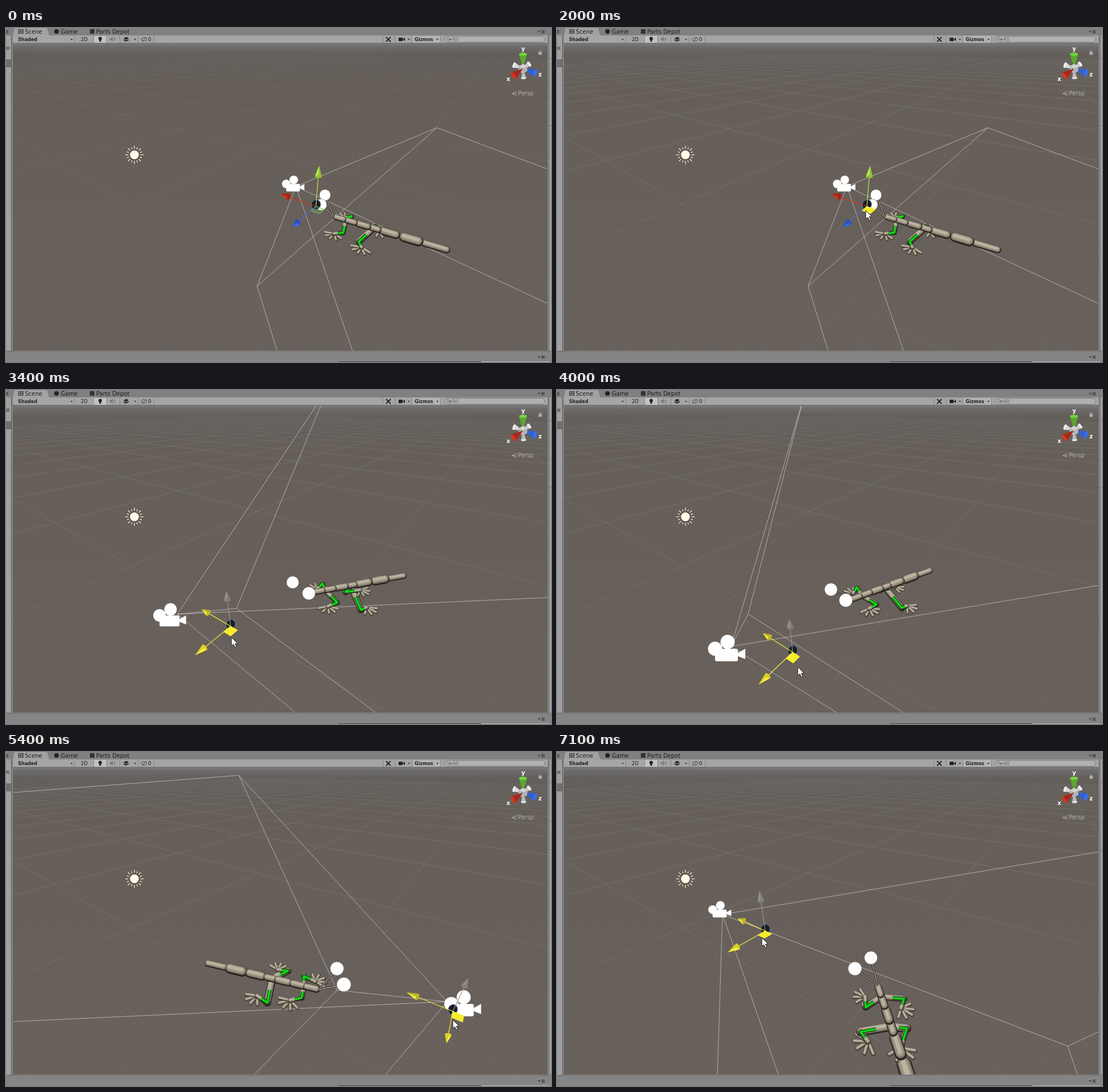
An HTML page with a canvas that plays this animation: 955 px wide and 586 px high, repeating every 7200 ms.

```html
<!DOCTYPE html>
<html lang="en">
<head>
<meta charset="utf-8">
<title>Scene view</title>
<style>
html, body { margin: 0; width: 100%; height: 100%; overflow: hidden; background: #858585; }
canvas { display: block; }
</style>
</head>
<body>
<canvas id="stage" width="955" height="586"></canvas>
<script>
const ctx = document.getElementById('stage').getContext('2d');
const LOOP = 7200, STEP = 100, GRAB = 2100;
const CX = 480, CY = 297, FOCAL = 466, HORIZON = 30;
const times = [2000, 2800, 4000, 5400, 6400, 7100];

// target x y, camera x y width, head x y, heading, two eye offsets, cursor offset
const poses = [
  [543, 313, 503, 273, 39, 575, 331, 149.8, -16, -38, -23, -21, -2, 7],
  [434, 358, 358, 323, 47, 568, 345, 191.4, -27, -22, -3, -2, -7, 11],
  [413, 460, 297, 453, 65, 515, 368, 209.5, -35, -18, -9, 1, 9, 26],
  [783, 455, 800, 441, 64, 548, 417, 341, 32, -37, 44, -9, 0, 15],
  [620, 268, 600, 229, 32, 583, 428, 391.3, 4, -51, 42, -34, -27, 4],
  [365, 314, 285, 276, 40, 562, 410, 454.8, -12, -49, -40, -30, -6, 12]
];
// knee and foot of each leg: front left, front right, hind left, hind right
const legPoses = [
  [591, 359, 575, 361, 606, 330, 592, 333, 618, 375, 623, 385, 646, 347, 654, 357],
  [609, 367, 592, 374, 584, 334, 577, 342, 646, 379, 657, 375, 624, 349, 645, 347],
  [560, 376, 547, 384, 525, 346, 519, 357, 604, 382, 613, 379, 566, 351, 592, 346],
  [522, 393, 542, 403, 518, 431, 498, 436, 494, 384, 476, 382, 458, 440, 440, 428],
  [532, 426, 546, 426, 578, 456, 584, 470, 488, 443, 470, 457, 523, 490, 490, 496],
  [541, 448, 540, 430, 608, 433, 603, 450, 532, 491, 545, 508, 613, 485, 602, 520]
];
// apex, far corners a and b, two ray ends, ends of the edges leaving a and b
const frustums = [
  [508, 278, 755, 175, 440, 453, 607, 566, 948, 483, 948, 247, 475, 566],
  [372, 324, 710, 10, 498, 386, 555, 566, 948, 409, 950, 0, 645, 566],
  [305, 450, 433, 10, 335, 393, 490, 566, 948, 343, 700, 0, 607, 566],
  [773, 438, 408, 41, 580, 418, 665, 566, 13, 473, 13, 71, 435, 566],
  [600, 237, 3000, 2135, 1500, 1668, 193, 566, 13, 405, 3000, 2300, 1500, 2000],
  [290, 285, 2000, 0, 895, 516, 388, 566, 281, 566, 2000, 100, 912, 566]
];

// screen point to ground point and back
function ground([x, y]) {
  const depth = 5380 / (y - HORIZON);
  return [(x - CX) * depth / FOCAL, (depth - 5) / 0.866];
}
function screen([x, z]) {
  const depth = z * 0.866 + 5;
  return [CX + FOCAL * x / depth, HORIZON + 5380 / depth];
}
const frameOf = p => ({ origin: ground([p[5], p[6]]), angle: p[7] * Math.PI / 180 });
function toLocal({ origin, angle }, point) {
  const [x, z] = ground(point), dx = x - origin[0], dz = z - origin[1];
  const c = Math.cos(angle), s = Math.sin(angle);
  return [-dx * c - dz * s, -dx * s + dz * c];
}
function toScreen({ origin, angle }, [back, left]) {
  const c = Math.cos(angle), s = Math.sin(angle);
  return screen([origin[0] - back * c - left * s, origin[1] - back * s + left * c]);
}
const pairs = list => list.filter((_, i) => i % 2 === 0).map((x, i) => [x, list[i * 2 + 1]]);
const legLocals = legPoses.map((row, i) => pairs(row).flatMap(p => toLocal(frameOf(poses[i]), p)));

// smooth curve through the rows of a table
function sample(table, t) {
  const last = times.length - 1;
  if (t <= times[0]) return table[0];
  if (t >= times[last]) return table[last];
  const i = times.findIndex((v, k) => t >= v && t < times[k + 1]);
  const span = times[i + 1] - times[i], u = (t - times[i]) / span;
  const slope = (k, c) => {
    const a = Math.max(k - 1, 0), b = Math.min(k + 1, last);
    return (table[b][c] - table[a][c]) / (times[b] - times[a]) * span;
  };
  return table[i].map((v, c) => {
    const w = table[i + 1][c], u2 = u * u, u3 = u2 * u;
    return v * (2 * u3 - 3 * u2 + 1) + w * (3 * u2 - 2 * u3) +
      slope(i, c) * (u3 - 2 * u2 + u) + slope(i + 1, c) * (u3 - u2);
  });
}
const lerp = (a, b, u) => [a[0] + (b[0] - a[0]) * u, a[1] + (b[1] - a[1]) * u];

function rect(x, y, w, h, color) {
  ctx.fillStyle = color;
  ctx.fillRect(x, y, w, h);
}
function line(points, color, width = 1) {
  ctx.beginPath();
  points.forEach(p => ctx.lineTo(...p));
  ctx.strokeStyle = color;
  ctx.lineWidth = width;
  ctx.stroke();
}
function poly(points, fill, stroke) {
  ctx.beginPath();
  points.forEach(p => ctx.lineTo(...p));
  ctx.closePath();
  ctx.fillStyle = fill;
  ctx.fill();
  if (stroke) { ctx.strokeStyle = stroke; ctx.lineWidth = 1; ctx.stroke(); }
}
function disc(x, y, r, fill) {
  ctx.beginPath();
  ctx.arc(x, y, r, 0, 7);
  ctx.fillStyle = fill;
  ctx.fill();
}
function text(str, x, y, size = 10, color = '#1c1c1c', weight = '') {
  ctx.font = `${weight} ${size}px "DejaVu Sans", sans-serif`;
  ctx.fillStyle = color;
  ctx.fillText(str, x, y);
}
function fade(stops) {
  const g = ctx.createLinearGradient(0, 28, 0, 566);
  stops.forEach(([y, color]) => g.addColorStop((y - 28) / 538, color));
  return g;
}

function drawGround(t) {
  rect(12, 28, 937, 538, fade([[28, '#77797c'], [33, '#6d6b6a'], [45, '#645e5a'], [110, '#665f59'], [566, '#69615b']]));
  const strength = 0.45 + 0.55 * Math.min(1, Math.max(0, (t - 300) / 1200));
  const family = (vx, first, gap, from, to, color) => {
    for (let i = from; i <= to; i++) {
      const dx = (first + gap * i - vx) / 165;
      line([[vx, HORIZON], [vx + dx * 1600, HORIZON + 1600]], color);
    }
  };
  ctx.globalAlpha = strength;
  const major = fade([[34, 'rgba(125,138,140,0)'], [75, 'rgba(125,138,140,.25)'], [190, 'rgba(125,138,140,.4)'], [566, 'rgba(125,138,140,.2)']]);
  const minor = fade([[300, 'rgba(130,140,140,0)'], [566, 'rgba(130,140,140,.12)']]);
  family(866, 735, 252, -16, 8, major);
  family(-269, 20, 351, 0, 20, major);
  family(866, 735, 25.2, -40, 20, minor);
  family(-269, 20, 35.1, -9, 50, minor);
  ctx.globalAlpha = 1;
}

function drawSun() {
  for (let i = 0; i < 16; i++) {
    const a = i * Math.PI / 8, end = i % 2 ? 14 : 16;
    const at = r => [225 + r * Math.cos(a), 222.5 + r * Math.sin(a)];
    line([at(10), at(end)], '#4a4540', 2.6);
    line([at(10.5), at(end)], '#fff6d8', 1.4);
  }
  disc(225, 222.5, 8.8, '#504a43');
  disc(225, 222.5, 7.8, '#fffbe8');
}

function drawFrustum(row, lift) {
  const [apex, a, b, c, d, aEnd, bEnd] = pairs(row);
  const top = [apex[0], apex[1] + lift];
  [[top, a], [top, b], [top, c], [top, d], [a, b], [a, aEnd], [b, bEnd]]
    .forEach(edge => line(edge, 'rgba(222,222,218,.62)'));
}

function capsule(a, b, radius) {
  const r = radius * 0.0866 * ((a[1] + b[1]) / 2 - HORIZON);
  const layer = (dx, dy, width, color) =>
    line([[a[0] + dx * r, a[1] + dy * r], [b[0] + dx * r, b[1] + dy * r]], color, width * r);
  ctx.lineCap = 'round';
  layer(0, 0, 2, '#27231f');
  layer(-0.04, -0.16, 1.65, '#756d60');
  layer(-0.08, -0.25, 1.3, '#9c9382');
  layer(-0.12, -0.36, 0.65, '#bcb3a1');
  ctx.lineCap = 'butt';
}

function drawLizard(pose, legs) {
  const frame = frameOf(pose), at = p => toScreen(frame, p), joints = pairs(legs);
  for (let k = 0; k < 4; k++) {
    const hip = [k < 2 ? 0.8 : 2.6, 0], knee = joints[k * 2], foot = joints[k * 2 + 1];
    const out = Math.atan2(foot[1] - hip[1], foot[0] - hip[0]);
    for (let f = -2; f <= 2; f++) {
      const a = out + f * 0.62;
      const tip = [foot[0] + 0.58 * Math.cos(a), foot[1] + 0.58 * Math.sin(a)];
      capsule(at(lerp(foot, tip, 0.25)), at(tip), 0.085);
    }
    capsule(at(hip), at(knee), k < 2 ? 0.16 : 0.2);
    capsule(at(knee), at(foot), 0.12);
    const bone = [lerp(hip, knee, 0.5), knee, lerp(knee, foot, 0.6)].map(at);
    ctx.lineJoin = 'round';
    line(bone, '#123c10', 6);
    line(bone, '#10d818', 3.6);
    ctx.lineJoin = 'miter';
  }
  [[5.52, 6.65, 0.2], [4.4, 5.2, 0.29], [3.2, 3.95, 0.25], [2.45, 2.9, 0.2],
    [1.65, 2.25, 0.22], [0.8, 1.4, 0.2], [0.12, 0.65, 0.19]]
    .forEach(([from, to, r]) => capsule(at([to, 0]), at([from, 0]), r));

  const head = [pose[5], pose[6]];
  for (const k of [8, 10]) {
    const eye = [head[0] + pose[k], head[1] + pose[k + 1]], r = 9.6 + (eye[1] - 300) * 0.024;
    line([head, eye], '#211e1b', 3);
    line([head, eye], '#b9ae9f', 1.3);
    disc(...eye, r + 0.4, '#77716a');
    disc(...eye, r, '#fff');
  }
}

function drawCamera(x, y, width) {
  ctx.save();
  ctx.translate(x, y);
  ctx.scale(width / 65, width / 65);
  disc(-20, 1, 12.5, '#fff');
  disc(2, -11, 12.5, '#fff');
  ctx.beginPath();
  ctx.roundRect(-20, 1, 40, 22, 3);
  ctx.fill();
  poly([[20, 8], [33, 1], [33, 19], [20, 14]], '#fff');
  ctx.restore();
}

function drawHandles(x, y, t) {
  const drag = t >= GRAB, p = (x - CX) / FOCAL, q = (CY - y) / FOCAL;
  const offset = (lat, up, depth) => [CX + FOCAL * (p + lat) / (1 + depth), CY - FOCAL * (q + up) / (1 + depth)];
  const axes = { x: [-0.812, 0.292, 0.506], y: [0, 0.866, -0.5], z: [-0.584, -0.406, -0.703] };
  const along = (axis, length) => offset(...axis.map(v => v * length));
  const arrow = (axis, color, shade) => {
    const base = along(axis, 0.124), tip = along(axis, 0.165);
    const angle = Math.atan2(tip[1] - base[1], tip[0] - base[0]);
    const side = s => [base[0] - s * 6 * Math.sin(angle), base[1] + s * 6 * Math.cos(angle)];
    line([[x, y], base], color, 1.2);
    poly([side(-1), tip, side(1)], color);
    poly([base, tip, side(1)], shade);
    ctx.beginPath();
    ctx.ellipse(...base, 2.5, 6, angle, 0, 7);
    ctx.fillStyle = shade;
    ctx.fill();
  };
  ctx.beginPath();
  ctx.ellipse(x, y - 3, 8, 9, 0.4, 0, 7);
  ctx.fillStyle = '#1b1c22';
  ctx.fill();
  ctx.strokeStyle = '#536f9c';
  ctx.lineWidth = 1.2;
  ctx.stroke();
  arrow(axes.y, drag ? '#96938e' : '#bde84a', drag ? '#827f7a' : '#8fc432');
  arrow(axes.x, drag ? '#f4ec3a' : '#d8321e', drag ? '#bdb425' : '#a52313');
  arrow(axes.z, drag ? '#f8f03c' : '#3a6cf0', drag ? '#d8cf28' : '#2850bd');
  const size = 0.035, mix = axes.z.map((v, i) => (v - axes.x[i]) * size);
  poly([[x, y], along(axes.z, size), offset(...mix), along(axes.x, -size)],
    t >= 1900 ? '#f6ee28' : 'rgba(120,220,80,.2)', t >= 1900 ? '#fff34a' : '#82c95a');
}

function drawCursor(x, y) {
  const shape = [[0, 0], [0, 15], [3.5, 12], [6, 17.5], [8.5, 16.3], [6.2, 11], [11, 11]];
  poly(shape.map(([dx, dy]) => [x + dx, y + dy]), '#fff', '#222');
}

function drawCompass() {
  const cone = (x, y, w, color, shade) => {
    const a = Math.atan2(y - 71, x - 906), nx = -Math.sin(a) * w, ny = Math.cos(a) * w;
    poly([[906, 71], [x + nx, y + ny], [x - nx, y - ny]], color);
    ctx.beginPath();
    ctx.ellipse(x, y, w * 0.4, w, a, 0, 7);
    ctx.fillStyle = shade;
    ctx.fill();
  };
  cone(890, 65, 5, '#d8d8d8', '#eee');
  cone(917, 63, 5, '#ccc', '#f2f2f2');
  cone(907, 88, 4.5, '#bbb', '#e4e4e4');
  cone(906, 46, 7, '#5aa92e', '#70d73e');
  cone(927, 79, 7, '#2f62d0', '#3b6fe8');
  poly([[906, 63], [914, 67], [913, 76], [905, 80], [898, 75], [899, 67]], '#b4b4b4');
  poly([[906, 63], [914, 67], [906, 71], [899, 67]], '#d2d2d2');
  cone(889, 84, 7, '#a8281a', '#cf3a24');
  text('y', 903, 40, 10, '#fff', 'bold');
  text('x', 877, 93, 10, '#fff', 'bold');
  text('z', 933, 85, 10, '#fff', 'bold');
  rect(933, 42, 6, 5, '#aaa');
  ctx.beginPath();
  ctx.arc(936, 42, 2, Math.PI, 0);
  ctx.strokeStyle = '#aaa';
  ctx.stroke();
  text('Persp', 897, 118, 10, '#b5b2ae');
  [111.5, 115, 118.5].forEach(y => line([[886, 115], [895, y]], '#a9a6a2'));
}

function menuIcon(x, y) {
  poly([[x - 6, y - 1], [x - 2, y - 1], [x - 4, y + 2]], '#333');
  [-2, 0, 2].forEach(d => rect(x, y + d, 6, 1, '#333'));
}
const caret = x => poly([[x - 2, 19], [x + 2, 19], [x, 21.5]], '#333');

function drawChrome() {
  rect(0, 0, 955, 28, '#808080');
  rect(0, 28, 12, 558, '#858585');
  rect(949, 28, 6, 558, '#858585');
  rect(0, 566, 955, 20, '#858585');
  rect(0, 13, 9, 553, '#a0a0a0');
  rect(0, 55, 9, 14, '#707070');
  rect(9, 13, 1, 555, '#606060');
  rect(952, 13, 3, 553, '#a0a0a0');
  rect(951, 13, 1, 555, '#686868');
  rect(952, 53, 3, 1, '#666');
  rect(952, 121, 3, 1, '#777');
  rect(952, 171, 3, 1, '#666');
  rect(0, 567, 955, 1, '#707070');
  rect(583, 585, 250, 1, '#444');
  rect(833, 585, 119, 1, '#bbb');
  [4, 6, 8].forEach(y => rect(0, y, 4, 1, '#333'));
  [33, 35, 37].forEach(y => rect(0, y, 6, 1, '#444'));
  poly([[12, 14], [15, 0], [72, 0], [76, 14]], '#a2a2a2');
  rect(12, 13, 937, 14, '#a5a5a5');
  rect(12, 26, 937, 2, '#747474');
  [22.5, 26, 29.5].forEach((x, i) => {
    line([[x, 2], [x, 10]], '#333');
    line([[21, 3 + i * 3], [31, 3 + i * 3]], '#333');
  });
  text('Scene', 33, 10);
  disc(88.5, 6, 4, '#222');
  text('Game', 96, 10);
  rect(147, 2, 8, 8, '#333');
  text('Parts Depot', 158, 10);
  menuIcon(938, 6);
  menuIcon(938, 577);

  [120, 153, 176, 199, 231, 259, 660, 681, 711, 761].forEach(x => rect(x, 14, 1, 12, '#858585'));
  rect(154, 14, 22, 12, '#c2c2c2');
  rect(712, 14, 49, 12, '#b2b2b2');
  text('Shaded', 21, 23, 8, '#222', 'bold');
  [115, 226, 706, 756].forEach(caret);
  text('2D', 131, 23, 8.5);
  disc(165, 18.5, 3, '#222');
  rect(163.5, 20, 3, 4, '#222');
  poly([[182, 18], [184, 18], [187, 15], [187, 24], [184, 21], [182, 21]], '#777');
  line([[189, 17], [189, 22]], '#777');
  line([[191, 16], [191, 23]], '#777');
  poly([[205, 21], [211, 18], [216, 21], [210, 24]], '#333');
  poly([[205, 18], [211, 15], [216, 18], [210, 21]], '#222', '#aaa');
  ctx.beginPath();
  ctx.ellipse(242, 20, 5, 3, 0, 0, 7);
  ctx.strokeStyle = '#444';
  ctx.stroke();
  line([[238, 24], [246, 16]], '#444');
  text('0', 249, 23, 8.5);
  line([[666, 16], [674, 24]], '#222', 1.8);
  line([[674, 16], [666, 24]], '#222', 1.8);
  rect(688, 17, 7, 6, '#222');
  poly([[695, 20], [699, 17], [699, 23]], '#222');
  text('Gizmos', 716, 23, 8, '#222', 'bold');
  ctx.beginPath();
  ctx.roundRect(768, 14.5, 176, 10.5, 5);
  ctx.fillStyle = '#b0b0b0';
  ctx.fill();
  ctx.strokeStyle = '#777';
  ctx.lineWidth = 1;
  ctx.stroke();
  ctx.beginPath();
  ctx.arc(774, 19, 2.3, 0, 7);
  ctx.stroke();
  line([[775.5, 21], [778, 23]], '#555');
  caret(779);
  text('All', 782, 23, 8.5, '#666');
}

function draw(t) {
  const pose = sample(poses, t);
  const swing = Math.min(1, Math.max(0, (t - 4000) / 1400)), lift = 45 * Math.sin(Math.PI * swing);
  const [tx, ty, cx, cy, cw] = pose;
  drawChrome();
  ctx.save();
  ctx.beginPath();
  ctx.rect(12, 28, 937, 538);
  ctx.clip();
  drawGround(t);
  drawSun();
  drawFrustum(sample(frustums, t), lift);
  drawLizard(pose, sample(legLocals, t));
  drawCamera(cx, cy + lift, cw);
  drawHandles(tx, ty + lift, t);
  drawCompass();
  if (t >= 1300) {
    const away = Math.max(0, (1900 - t) / 600) ** 2;
    drawCursor(tx + pose[12] + 100 * away, ty + lift + pose[13] + 160 * away);
  }
  ctx.restore();
}

function tick() {
  draw(Math.floor(performance.now() % LOOP / STEP) * STEP);
  requestAnimationFrame(tick);
}
tick();
</script>
</body>
</html>
```
